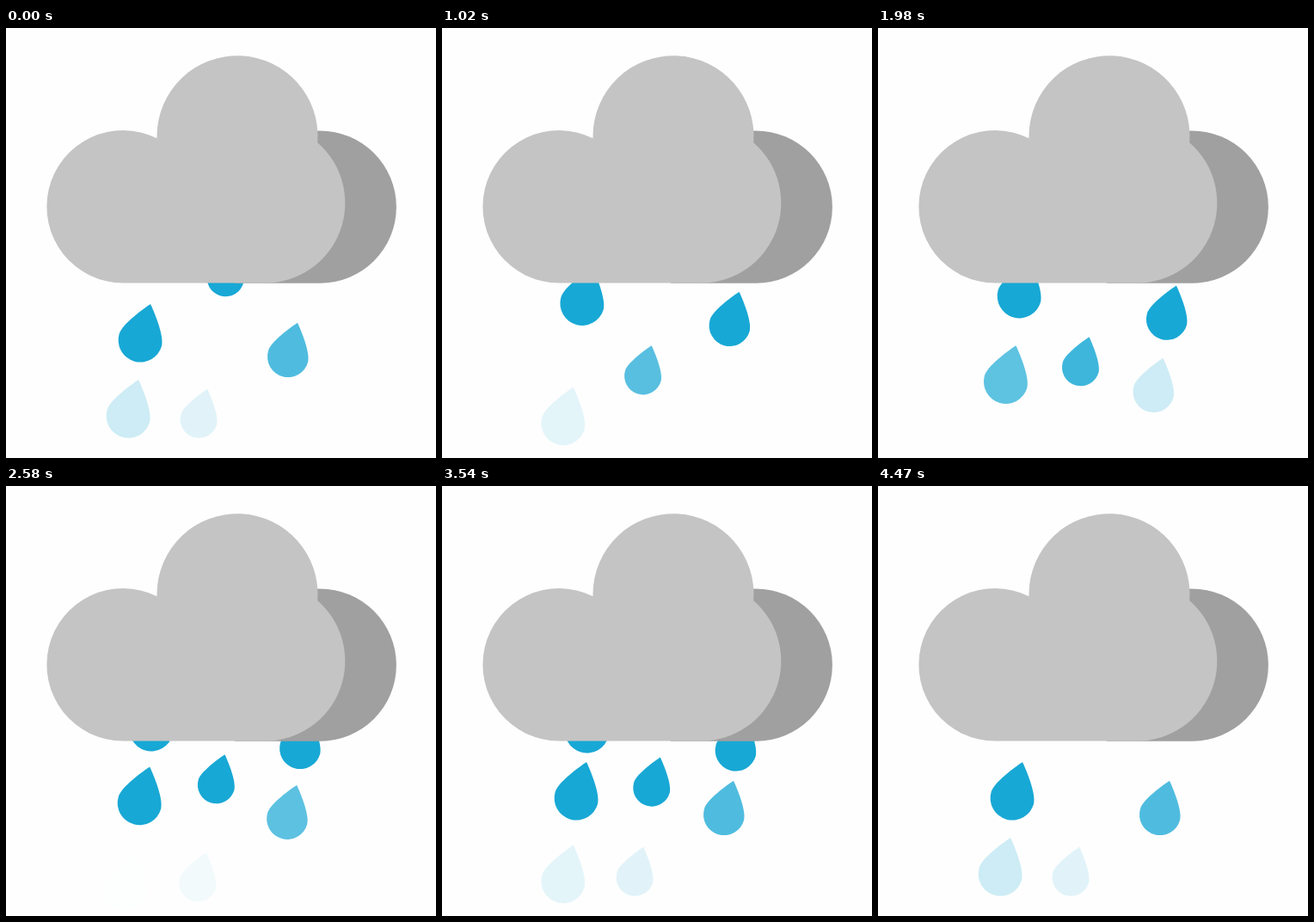
An HTML page for the animation above (4.5 s loop, 500 px wide and 500 px high).

```html
<!DOCTYPE html>
<html lang="en">
<head>
<meta charset="utf-8">
<title>Rain cloud</title>
<style>
  html, body { margin: 0; width: 100%; height: 100%; overflow: hidden; background: #fefefe; }
  svg { display: block; width: 100%; height: 100%; }
</style>
</head>
<body>
<svg viewBox="0 0 500 500">
  <defs>
    <path id="drop" d="M0-43.6C0-43.6 25.7-14.2 25.7 0A25.7 25.7 0 0 1-25.7 0C-25.7-14.2 0-43.6 0-43.6Z"/>
  </defs>
  <g id="rain" fill="#18a8d5"></g>
  <path fill="#a0a0a0" d="M266 296.7V160L362 119.5H365.3A88.6 88.6 0 0 1 365.3 296.7Z"/>
  <path fill="#c4c4c4" d="M136.3 296.5A88.75 88.75 0 1 1 175.5 128.2V125.5A93.5 93.5 0 1 1 362.2 133.2A93 93 0 0 1 301.5 296.5Z"/>
</svg>
<script>
const LOOP = 4500, TICK = 30;
const CYCLE = LOOP - TICK; // the last tick repeats the first pose
const STARTS = [0, 1050, 2070, 3000];

// path: [ms, x, y] points, extended past the ends; fade: [from, to] in ms
const DROPS = [
  { scale: 1, path: [[510, 169, 282.7], [930, 164.4, 311.7], [2490, 141, 459.6]], fade: [1710, 2585] },
  { scale: 0.844, path: [[0, 255.3, 290.5], [1530, 223, 461.8]], fade: [805, 1565] },
  { scale: 0.934, path: [[0, 349.6, 264.2], [1980, 320.5, 423]], fade: [1250, 2170] }
];

const rain = document.getElementById("rain");
const drops = STARTS.flatMap(start => DROPS.map(drop => {
  const el = document.createElementNS("http://www.w3.org/2000/svg", "use");
  el.setAttribute("href", "#drop");
  rain.append(el);
  return { ...drop, start, el };
}));

function pointAt(path, t) {
  let i = 1;
  while (i < path.length - 1 && t > path[i][0]) i++;
  const [a, b] = [path[i - 1], path[i]];
  const k = (t - a[0]) / (b[0] - a[0]);
  return [a[1] + (b[1] - a[1]) * k, a[2] + (b[2] - a[2]) * k];
}

function draw(time) {
  for (const { el, start, scale, path, fade } of drops) {
    const age = time < start ? time - start + CYCLE : time - start;
    const [x, y] = pointAt(path, age);
    const alpha = (fade[1] - age) / (fade[1] - fade[0]);
    el.setAttribute("transform", `translate(${x} ${y}) rotate(15.6) scale(${scale})`);
    el.setAttribute("opacity", Math.max(0, Math.min(1, alpha)));
  }
}

let origin = null;
function step(now) {
  origin ??= now;
  draw(Math.floor(((now - origin) % LOOP) / TICK) * TICK);
  requestAnimationFrame(step);
}
draw(0);
requestAnimationFrame(step);
</script>
</body>
</html>
```
